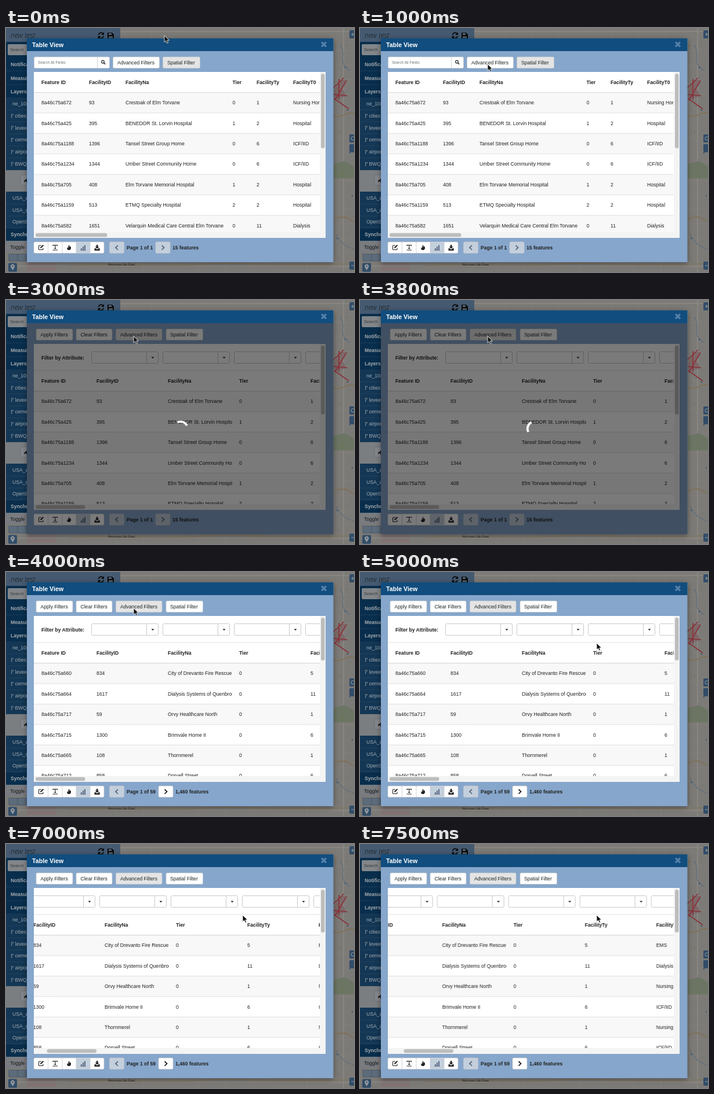
Recreate the animation shown at these times as an HTML page. Size 600 by 422 pixels, loop 8 s.

```html
<!DOCTYPE html>
<html lang="en">
<head>
<meta charset="utf-8">
<title>Table View</title>
<style>
html, body { margin: 0; width: 100%; height: 100%; overflow: hidden; }
#stage { display: block; width: 100vw; height: 100vh; font: 8.6px "Liberation Sans", Arial, sans-serif; fill: #222; }
text { white-space: pre; }
.b { font-weight: bold; }
.list, .filters, .busy, .ready, .press, .cursor, .spin, .scroll, .thumb { animation: 8s step-end infinite; }
.list { animation-name: list; }
.filters { animation-name: filters; }
.busy { animation-name: busy; }
.ready { animation-name: ready; }
.press { animation-name: press; }
.cursor { animation-name: cursor; }
.spin { animation-name: spin; transform-origin: 301px 222.5px; }
.scroll { animation-name: scroll; }
.thumb { animation-name: thumb; }
.modal { filter: drop-shadow(0 2px 5px rgba(0, 0, 0, .4)); }
@keyframes list { 0% { opacity: 1 } 37.5%, 100% { opacity: 0 } }
@keyframes filters { 0% { opacity: 0 } 37.5%, 100% { opacity: 1 } }
@keyframes busy { 0% { opacity: 0 } 37.5% { opacity: 1 } 50%, 100% { opacity: 0 } }
@keyframes ready { 0% { opacity: 0 } 50%, 100% { opacity: 1 } }
@keyframes press { 0% { fill: #fff } 35%, 100% { fill: #e4e4e4 } }
@keyframes cursor {
  0% { transform: translate(273px, 13px) }
  3.75% { transform: translate(247px, 36px) }
  6.25% { transform: translate(234px, 47px) }
  10% { transform: translate(220.5px, 63px) }
  12.5% { transform: translate(220px, 62.5px) }
  56.25% { transform: translate(272px, 85px) }
  60% { transform: translate(403px, 122px) }
  62.5%, 100% { transform: translate(408px, 123px) }
}
@keyframes spin {
  0% { transform: rotate(18deg) }
  41.25% { transform: rotate(108deg) }
  43.75% { transform: rotate(198deg) }
  47.5%, 100% { transform: rotate(288deg) }
}
@keyframes scroll {
  0% { transform: none }
  78.75% { transform: translateX(-15.2px) }
  81.25% { transform: translateX(-46px) }
  85% { transform: translateX(-82px) }
  87.5% { transform: translateX(-109px) }
  91.25% { transform: translateX(-128px) }
  93.75%, 100% { transform: translateX(-137.4px) }
}
@keyframes thumb {
  0% { transform: none }
  78.75% { transform: translateX(2.5px) }
  81.25% { transform: translateX(8px) }
  85% { transform: translateX(14.5px) }
  87.5% { transform: translateX(19.5px) }
  91.25% { transform: translateX(23px) }
  93.75%, 100% { transform: translateX(24.5px) }
}
</style>
</head>
<body>
<svg id="stage" viewBox="0 0 600 422"></svg>
<script>
const rect = (x, y, w, h, fill, more = '') =>
  `<rect x="${x}" y="${y}" width="${w}" height="${h}" fill="${fill}" ${more}/>`;
const text = (x, y, s, more = '') => `<text x="${x}" y="${y}" ${more}>${s}</text>`;
const bold = (x, y, s, more = '') => text(x, y, s, 'class="b" ' + more);
const line = (d, color, w = 1, more = '') =>
  `<path d="${d}" fill="none" stroke="${color}" stroke-width="${w}" ${more}/>`;
const shape = (d, fill = '#222') => `<path d="${d}" fill="${fill}"/>`;
const group = (name, ...parts) => `<g class="${name}">${parts.join('')}</g>`;
const EDGE = 'stroke="#c4c8cc" stroke-width=".7"';
const WHITE = '#fff', ACTIVE = '#e4e4e4', DISABLED = '#c4cfdc';

function button(x, w, label, textX, fill = WHITE, more = '') {
  return rect(x, 50, w, 19.5, fill, `rx="2" ${EDGE} ${more}`) + text(textX, 63, label);
}

function map() {
  const road = '#c5c1ba', minor = '#b8b4ae';
  let s = rect(0, 0, 600, 422, '#aeaba7');
  for (let i = 0; i < 9; i++) s += line(`M${205 + i * 46} 0v20M${190 + i * 47} 400v22`, minor, .8);
  for (let i = 0; i < 17; i++) s += line(`M560 ${14 + i * 25}l40 ${i % 3 - 1}`, minor, .8);
  s += rect(36, 406, 50, 14, '#b5a2a2');
  s += line('M197 6H600M20 412H600M582 0V422', road, 1.6);
  s += line('M110 411C180 406 260 414 330 409S500 414 600 407', '#b5a583', 1.6);
  s += line('M565 152C582 156 588 144 600 147M566 330Q585 322 600 336', '#b59c76', 1.6);
  s += line('M576 28C589 49 569 59 594 74M569 357Q580 378 600 382', '#7d9aae', 1.2);
  s += shape('M566 108L576 90H586L580 105L587 118L566 123Z', '#b09294');
  s += line('M564 104L583 86M567 125L587 91M564 115L588 117M574 88V124M566 122L591 140', '#c0454f', 1.6);
  s += shape('M565 235L584 230L600 239V260H565Z', '#98a58b');
  for (let i = 0; i < 11; i++) {
    s += rect(567 + i * 17 % 30, 30 + i * 37 % 370, 2, 2, i % 2 ? '#45729d' : '#b29352');
  }
  s += text(176, 410.5, 'Merrivane Oak Road', 'font-size="5" fill="#333"');
  for (const y of [4, 184, 201, 404]) s += rect(592, y, 10, 14, '#456c94', 'rx="2"');
  return s + line('M595 11h5M597.5 8.5v5M595 411h5', '#d1d9df', 1.2)
    + '<circle cx="598" cy="191" r="3" fill="none" stroke="#d1d9df"/>';
}

function sidebar() {
  const fork = y => line(`M9.500 ${y - 2.5}v5.5M12 ${y - 2.5}v1.5L9.500 ${y + 1}`, '#c4d0dc', .7)
    + `<g fill="#c4d0dc"><circle cx="9.5" cy="${y - 2.5}" r=".8"/><circle cx="12" cy="${y - 2.5}" r=".8"/><circle cx="9.5" cy="${y + 3}" r=".8"/></g>`;
  const pale = 'fill="#e6edf3"';
  let s = rect(0, 0, 197, 388, '#0c416d') + rect(0, 0, 197, 24, '#617f9f');
  s += text(8, 17, 'new test', 'font-family="Open Sans, sans-serif" font-style="italic" font-weight="300" font-size="12.5"');
  s += line('M159.5 12a4.5 4.5 0 0 1 8-2M168 14a4.5 4.5 0 0 1-8 2', '#111', 1.7);
  s += shape('M169 7v5h-5zM158.500 19v-5h5z', '#111');
  s += shape('M175 8h8l3 3v8h-11z', '#111') + rect(177, 9, 5, 3, '#7890aa') + rect(177, 14.5, 7, 3, '#7890aa');
  s += rect(3, 28, 150, 19, '#b7bcc2', 'rx="2"') + text(7, 40, 'Search', 'font-size="7.5" fill="#555"');
  [['Notifications', 62], ['Measure', 86], ['Layers', 109]].forEach(([name, y]) => {
    s += bold(8, y + 3.5, name, pale) + line(`M0 ${y + 12}H197`, '#315c83', .8);
  });
  s += rect(0, 121, 197, 125, '#1b4d78');
  ['ne_10m', 'cities', 'levees', 'cemetery', 'airports', 'BWQ_'].forEach((name, i) => {
    const y = 131 + i * 20.8;
    s += text(i ? 15.5 : 11, y + 3, name, pale) + (i ? fork(y) : '') + line(`M0 ${y + 10.4}H197`, '#41678b', .7);
  });
  s += rect(0, 246, 197, 37, '#adb1b6') + rect(25, 254, 40, 18, '#b8bdc4', 'rx="2" stroke="#88919c" stroke-width=".7"');
  s += shape('M31 267q0-5 4-5v-2l5 4-5 4v-3q-2 0-4 2');
  s += rect(0, 283, 197, 63, '#1b4d78');
  ['USA_a', 'USA_a', 'OpenStreetMap'].forEach((name, i) => {
    s += text(11, 297 + i * 20.6, name, pale) + line(`M0 ${304.5 + i * 20.6}H197`, '#41678b', .7);
  });
  s += bold(8, 360, 'Synchronize', pale);
  s += rect(0, 368, 197, 20, '#a9adb2') + text(7, 381.5, 'Toggle');
  s += rect(5, 391, 60, 12, '#8398ad', 'stroke="#5e748b" stroke-width=".8"') + line('M20 391v12M35 391v12', '#5e748b', .8);
  s += rect(4, 406.5, 15, 15, '#456c94', 'rx="2"') + shape('M11.500 419l-3-5a3.500 3.500 0 1 1 6 0z', '#d1d9df');
  return s + '<circle cx="11.5" cy="412" r="1.2" fill="#456c94"/>';
}

// Rows of cells; each cell clips its text to the column width.
function table(cols, top, rows, width) {
  let s = '';
  const cells = (row, y, cls) => row.map((v, i) =>
    `<svg x="${cols[i]}" y="${y - 10}" width="${width(i)}" height="20">${text(0, 13, v, `class="${cls}"`)}</svg>`).join('');
  s += cells(['Feature ID', 'FacilityID', 'FacilityNa', 'Tier', 'FacilityTy', 'FacilityT0'], top - 17.8, 'b');
  rows.forEach((row, i) => {
    const y = top + i * 35.4;
    s += rect(0, y, 900, 35.4, i % 2 ? WHITE : '#f8f8f8') + line(`M0 ${y}H900`, '#d9d9d9', i ? .8 : 1.1);
    s += cells(['8a46c75a' + row[0], ...row.slice(1)], y + 17.7, '');
  });
  return s;
}
const view = inner =>
  `<svg x="48" y="76" width="492.5" height="277" viewBox="48 76 492.5 277">${inner}</svg>`;
const bar = (x, y, w, h, more = '') => rect(x, y, w, h, '#bdbdbd', `rx="3" ${more}`);

function pager(total, features, nextX, more) {
  const y = 382.5;
  return bold(208, y, 'Page 1 of ' + total)
    + rect(nextX, 370, 25, 19.5, more ? WHITE : DISABLED, `rx="2" ${EDGE}`)
    + line(`M${nextX + 10.5} 376l4 3.800-4 3.800`, more ? '#222' : '#596a7c', 1.8)
    + bold(nextX + 29, y, features + ' features');
}

function tools() {
  let s = rect(48, 370, 121, 19.5, WHITE, `rx="2" ${EDGE}`) + rect(121, 370.3, 24, 18.9, DISABLED);
  s += line('M72.500 370v19.500M97 370v19.500M121 370v19.500M145 370v19.500', '#c4c8cc', .8);
  s += line('M61 376h-3.500q-1 0-1 1v5.500q0 1 1 1h5.500q1 0 1-1v-2', '#222', 1.1) + line('M59.500 380.500l5-5', '#222', 2);
  s += line('M81 377v-1.500h7.500v1.500M84.750 375.500v6M83 381.500h3.500M80.500 384h8.500', '#222', 1.2);
  s += shape('M109 375q1 2 0 3.500 1.500 0 1.800-1.500 3 4-.8 7h-3q-3-2-1-5 .5 1.500 1.500 1.500-1-3 1.500-5.500');
  s += line('M130 384v-3M133 384v-6M136 384v-8.500', '#52677e', 1.9) + line('M128 384.500h10', '#52677e', .8);
  s += shape('M155.800 375h2.600v3.200h2.300l-3.600 3.600-3.600-3.600h2.300zM152.500 381h2l2.600 2.200 2.600-2.200h2v4h-9.200z');
  s += rect(178.5, 370, 25, 19.5, DISABLED, `rx="2" ${EDGE}`);
  return s + line('M193 376l-4 3.800 4 3.800', '#596a7c', 1.8);
}

const nearby = [
  ['672', 93, 'Crestoak of Elm Torvane', 0, 1, 'Nursing Home'],
  ['425', 395, 'BENEDOR St. Lorvin Hospital', 1, 2, 'Hospital'],
  ['1188', 1396, 'Tansel Street Group Home', 0, 6, 'ICF/IID'],
  ['1234', 1344, 'Umber Street Community Home', 0, 6, 'ICF/IID'],
  ['705', 408, 'Elm Torvane Memorial Hospital', 1, 2, 'Hospital'],
  ['1159', 513, 'ETMQ Specialty Hospital', 2, 2, 'Hospital'],
  ['582', 1651, 'Velarquin Medical Care Central Elm Torvane', 0, 11, 'Dialysis']
];
const everything = [
  ['660', 834, 'City of Drevanto Fire Rescue', 0, 5, 'EMS'],
  ['664', 1617, 'Dialysis Systems of Quenbrooke', 0, 11, 'Dialysis'],
  ['717', 59, 'Orvy Healthcare North', 0, 1, 'Nursing Home'],
  ['715', 1300, 'Brimvale Home II', 0, 6, 'ICF/IID'],
  ['665', 108, 'Thornmerel', 0, 1, 'Nursing Home'],
  ['712', 858, 'Dorvell Street', 0, 6, 'ICF/IID']
];

function filterTable(rows) {
  let s = bold(61, 102.5, 'Filter by Attribute:');
  for (let i = 0; i < 5; i++) {
    const x = 147.5 + i * 123;
    s += rect(x, 89.5, 115, 20, WHITE, 'rx="2" stroke="#bbb" stroke-width=".8"');
    s += line(`M${x + 95} 89.500v20`, '#bbb', .8) + shape(`M${x + 103} 98.500h5l-2.500 2.800z`);
  }
  s += line('M0 122H900', '#d9d9d9', .8);
  return s + table([61, 156, 279, 402, 525, 648], 157.6, rows, i => i ? 111 : 85);
}

const panel = rect(48, 76, 503, 287, WHITE) + rect(541, 76, 10, 287, '#f4f4f4') + rect(48, 353, 503, 10, '#f4f4f4');

const list = group('list',
  rect(48.5, 50, 130, 19.5, WHITE, `rx="2" ${EDGE}`), line('M157.500 50v19.500', '#c4c8cc', .8),
  text(55, 62.3, 'Search All Fields', 'font-size="6.4" fill="#777"'),
  '<circle cx="167" cy="58.500" r="2.300" fill="none" stroke="#222" stroke-width="1.200"/>', line('M168.700 60.200l2.500 2.500', '#222', 1.5),
  button(184.5, 80, 'Advanced Filters', 192, WHITE, 'class="press"'),
  button(270.5, 64, 'Spatial Filter', 278, ACTIVE),
  panel, view(table([61, 143, 206, 390.5, 432, 495], 111.5, nearby, i => i === 2 ? 176 : 80)),
  bar(543, 79, 6.5, 129), bar(51, 354.7, 123.5, 6.5),
  pager(1, 15, 258, false));

const filters = group('filters',
  rect(40, 44, 515, 30, '#86a6cb'), rect(205, 367, 200, 28, '#86a6cb'),
  button(52, 63, 'Apply Filters', 59.5), button(121, 62, 'Clear Filters', 128.5),
  button(189.5, 79.5, 'Advanced Filters', 197, ACTIVE), button(276, 63.5, 'Spatial Filter', 283),
  panel,
  group('busy', view(filterTable(nearby.slice(0, 6))), bar(543, 79, 6.5, 119), pager(1, 15, 258, false)),
  group('ready', view(group('scroll', filterTable(everything))), bar(543, 79, 6.5, 74), pager(59, '1,460', 263, true)),
  bar(51, 354.7, 85.5, 6.5, 'class="thumb"'));

const busy = group('busy', rect(36, 40, 528.5, 365, '#000', 'opacity=".52"'),
  group('spin', shape('M291.100 212.600A14 14 0 0 1 310.900 212.600L308.600 215.400A10.500 10.500 0 0 0 293.400 215.400Z', WHITE)));

const backdrop = rect(0, 0, 600, 422, '#000', 'opacity=".29"');

document.getElementById('stage').innerHTML = [
  map(), sidebar(), backdrop,
  group('modal', rect(36, 18, 528.5, 387, '#86a6cb')),
  rect(36, 18, 528.5, 22, '#114d7e'),
  bold(45, 33, 'Table View', 'fill="#fff" font-size="10.7"'),
  line('M544 24.300l8 8M552 24.300l-8 8', '#5481aa', 3.2),
  tools(), list, filters, busy,
  group('cursor', '<path d="M0 0V11.500L2.700 9L4.500 13.200L6.600 12.300L4.800 8.200H8.400Z" fill="#111" stroke="#fff" stroke-width=".8"/>')
].join('');
</script>
</body>
</html>
```
